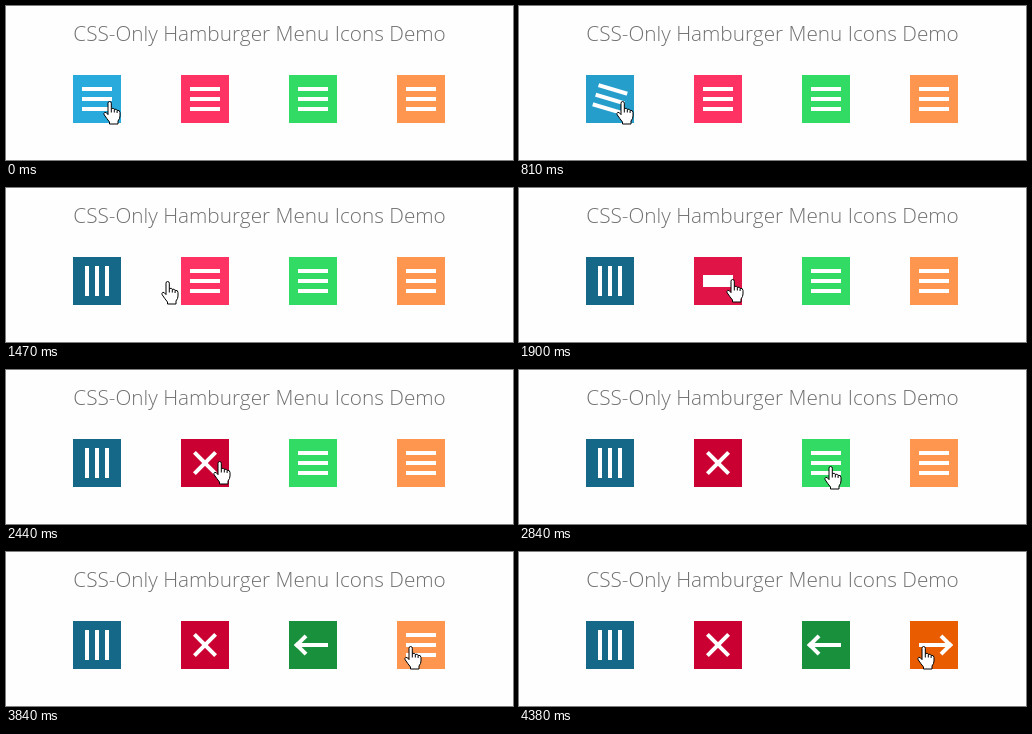
Animation of 507x154 px, one loop 5250 ms. Source, as an HTML page:

```html
<!DOCTYPE html>
<html lang="en">
<head>
<meta charset="utf-8">
<title>Hamburger Menu Icons</title>
<style>
html, body { margin: 0; width: 100%; height: 100%; overflow: hidden; background: #fefefe; }
h1 {
  position: absolute; left: 0; top: 12px; width: 507px; margin: 0;
  font: 350 20.75px/30px "Open Sans", sans-serif;
  color: #707070; text-align: center; white-space: nowrap;
}

/* Every animation is paused; --t (set by script) picks its moment.
   The delay stops just short of the end so that the last pose is kept. */
.icon, .icon span, .icon span::before, .icon span::after {
  --end: -299.9ms;
  --delay: max(var(--end), var(--start) - var(--t));
  animation: none .3s ease var(--delay) both paused;
}
.icon {
  position: absolute; top: 69px; width: 48px; height: 48px;
  background: var(--color);
  animation-name: darken;
  animation-delay: max(var(--end), var(--start) + var(--lag, 0ms) - var(--t));
}
.icon span { position: absolute; top: 22px; left: 9px; right: 9px; height: 4px; background: #fff; }
.icon span::before, .icon span::after {
  content: ""; position: absolute; left: 0; width: 100%; height: 4px; background: #fff;
}
.icon span::before { top: -10px; }
.icon span::after { bottom: -10px; }
@keyframes darken { to { background: var(--active); } }

.bars { left: 67px; --color: #28aadc; --active: #166888; --start: 765ms; }
.bars span { animation-name: quarter; }
@keyframes quarter { to { transform: rotate(90deg); } }

.cross { left: 175px; --color: #ff3264; --active: #cb0032; --start: 1795ms; }
.cross span { animation-name: vanish; animation-timing-function: step-end; }
.cross span::before { animation-name: drop, tilt-down; }
.cross span::after { animation-name: rise, tilt-up; }
.cross span::before, .cross span::after {
  animation-delay: var(--delay), max(var(--end), var(--start) + 300ms - var(--t));
}
@keyframes vanish { 99%, to { background: transparent; } }
@keyframes drop { to { top: 0; } }
@keyframes rise { to { bottom: 0; } }
@keyframes tilt-down { to { transform: rotate(45deg); } }
@keyframes tilt-up { to { transform: rotate(-45deg); } }

.arrow span { animation-name: half; }
.arrow span::before { transform-origin: var(--side) top; animation-name: head-top; }
.arrow span::after { transform-origin: var(--side) bottom; animation-name: head-bottom; }
@keyframes half { to { transform: rotate(180deg); } }
@keyframes head-top {
  from { transform: translate(0, 0) rotate(0deg); }
  to { top: 0; width: 50%; transform: translate(var(--shift), 2px) rotate(var(--angle)); }
}
@keyframes head-bottom {
  from { transform: translate(0, 0) rotate(0deg); }
  to { bottom: 0; width: 50%; transform: translate(var(--shift), -2px) rotate(calc(-1 * var(--angle))); }
}
.left {
  left: 283px; --color: #32dc64; --active: #18903c; --start: 2940ms; --lag: 50ms;
  --side: right; --shift: 19px; --angle: 45deg;
}
.right {
  left: 391px; --color: #ff9650; --active: #e95d00; --start: 4075ms;
  --side: left; --shift: -4px; --angle: -45deg;
}

#hand { position: absolute; left: 0; top: 0; overflow: visible; }
</style>
</head>
<body style="--t: 0ms">
<h1>CSS-Only Hamburger Menu Icons Demo</h1>
<div class="icon bars"><span></span></div>
<div class="icon cross"><span></span></div>
<div class="icon arrow left"><span></span></div>
<div class="icon arrow right"><span></span></div>
<svg id="hand" width="18" height="24" stroke="#000" stroke-linejoin="round">
  <path fill="#fff" d="M5 2.2Q5 .5 6.6 .5Q8.3 .5 8.3 2.2V7.5Q10.9 6.7 11.3 8.3Q13.6 7.7 14.1 9.3Q17 9 17 11.5V15Q17 17.5 15 20V23H6.5V21Q4 18 1.2 13.8Q.4 12 1.8 11.3Q3.2 10.9 5 13.6Z"/>
  <path fill="none" d="M8.3 7.5V11.5M11.3 8.3V11.5M14.1 9.3V12"/>
</svg>
<script>
const LOOP = 5250;
// The picture is held between these moments.
const ticks = [0, 810, 930, 1050, 1190, 1470, 1590, 1900, 2040, 2170, 2290, 2440, 2560,
  2710, 2840, 2990, 3140, 3260, 3420, 3560, 3690, 3840, 4140, 4260, 4380];
// [time, x, y]
const handStops = [[0, 97, 95], [1470, 155, 93], [1590, 207, 91], [2560, 273, 91],
  [2710, 298, 95], [2840, 305, 96], [3420, 355, 96], [3560, 390, 95],
  [3690, 398, 95], [3840, 398, 94]];
const hand = document.getElementById("hand");
let shown = -1;

function draw(now) {
  const time = now % LOOP;
  const tick = ticks.findLast(t => t <= time) ?? 0;
  if (tick !== shown) {
    shown = tick;
    const [, x, y] = handStops.findLast(stop => stop[0] <= tick);
    document.body.style.setProperty("--t", tick + "ms");
    hand.style.transform = `translate(${x}px, ${y}px)`;
  }
  requestAnimationFrame(draw);
}
draw(0);
</script>
</body>
</html>
```
